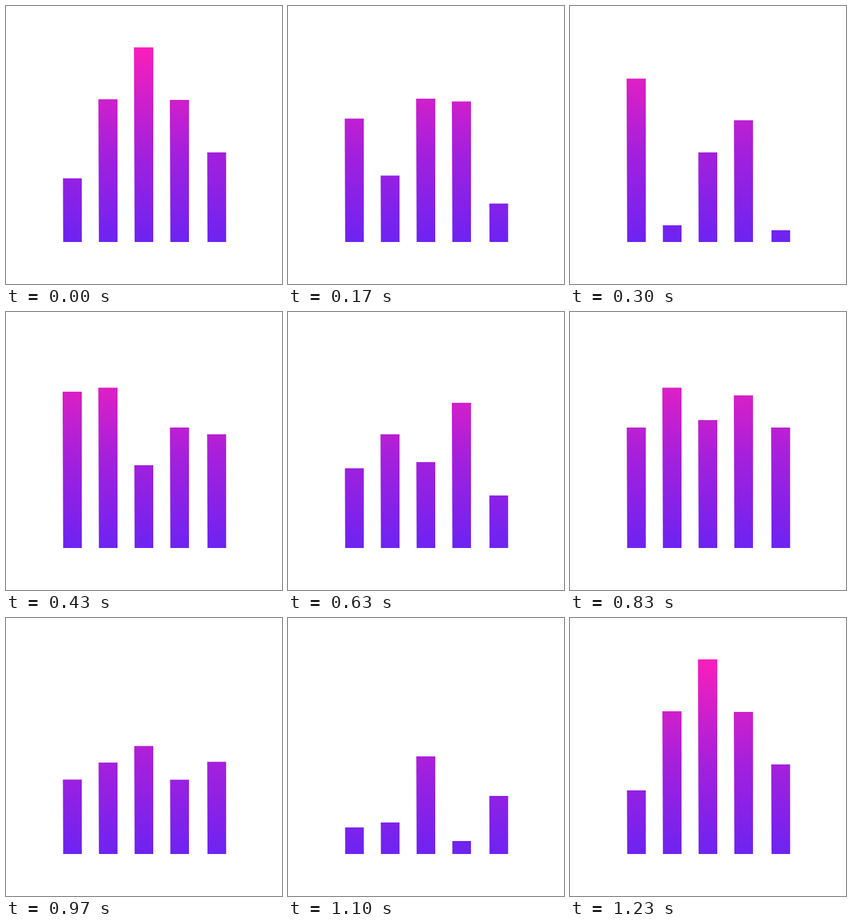
These frames come from a looping animation (448x450 px, 1260 ms). An HTML page with a canvas:

```html
<!DOCTYPE html>
<html>
<head>
<meta charset="utf-8">
<title>Equalizer</title>
<style>
  html, body { margin: 0; width: 100%; height: 100%; overflow: hidden; background: #fff; }
  canvas { display: block; }
</style>
</head>
<body>
<canvas id="stage" width="448" height="450"></canvas>
<script>
const ctx = document.getElementById('stage').getContext('2d');
const LOOP = 1260, CYCLE = 37, PEAK = 67, BASE = 382, WIDTH = 30.2, LEAN = 0.0035;
const rightEdges = [123, 181, 239, 297, 357.3];

// Key poses of the five bars; the curve between them is smooth and periodic.
const poses = [
  { at: 0, tops: [279, 151, 67, 152, 237] },
  { at: 9, tops: [117.5, 355, 237, 185, 363] },
  { at: 13, tops: [129, 122.5, 248, 187, 198] },
  { at: 19, tops: [253, 198, 243, 147, 297] },
  { at: 25, tops: [187, 122.5, 175, 135, 187] },
  { at: 33, tops: [339, 331, 224, 361, 288] }
];

const fill = ctx.createLinearGradient(0, PEAK, 0, BASE);
fill.addColorStop(0, '#f91fba');
fill.addColorStop(0.54, '#a420dc');
fill.addColorStop(1, '#6d23f2');

function key(i, bar) {
  const n = poses.length, { at, tops } = poses[(i + n) % n];
  return { t: at + Math.floor(i / n) * CYCLE, y: tops[bar] };
}

// Catmull-Rom interpolation through the poses
function topAt(step, bar) {
  const i = poses.findLastIndex(pose => pose.at <= step);
  const [a, b, c, d] = [-1, 0, 1, 2].map(k => key(i + k, bar));
  const span = c.t - b.t, u = (step - b.t) / span, v = 1 - u;
  const slopeIn = (c.y - a.y) / (c.t - a.t), slopeOut = (d.y - b.y) / (d.t - b.t);
  return v * v * (1 + 2 * u) * b.y + u * u * (1 + 2 * v) * c.y
    + span * u * v * (v * slopeIn - u * slopeOut);
}

function drawBar(right, top) {
  const left = right - WIDTH;
  ctx.beginPath();
  ctx.moveTo(right, BASE);
  ctx.lineTo(left, BASE);
  ctx.lineTo(left - (BASE - top) * LEAN, top);
  ctx.lineTo(right, top);
  ctx.fill();
}

function draw() {
  const time = performance.now() % LOOP;
  // 30 steps per second, on 10 ms ticks
  const step = Math.floor((Math.floor(time / 10) + 0.5) * 0.3) % CYCLE;
  ctx.clearRect(0, 0, 448, 450);
  ctx.fillStyle = fill;
  rightEdges.forEach((right, bar) => drawBar(right, topAt(step, bar)));
  requestAnimationFrame(draw);
}
draw();
</script>
</body>
</html>
```
